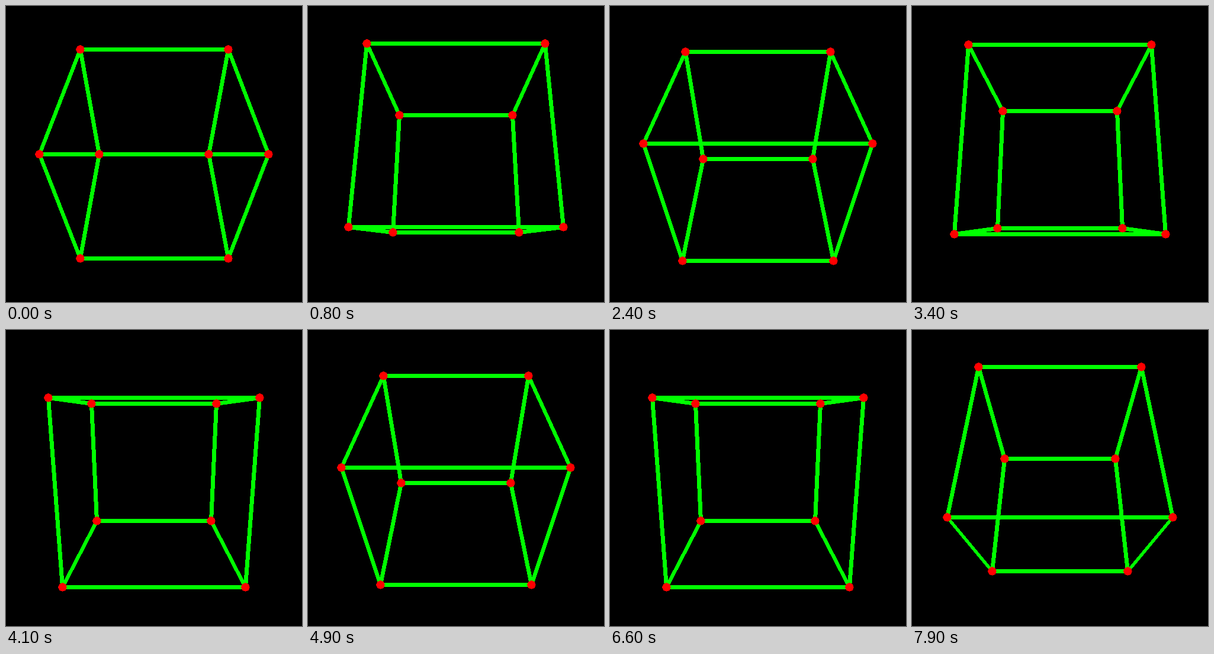
These frames come from a looping animation (500 by 500 pixels, 8 s). An HTML page:

```html
<!DOCTYPE html>
<html lang="en">
<head>
<meta charset="utf-8">
<title>Rotating cube</title>
<style>
  html, body { margin: 0; width: 100%; height: 100%; overflow: hidden; background: #000; }
  svg { display: block; width: 500px; height: 500px; shape-rendering: crispEdges; }
  polygon { fill: #0f0; }
  circle { fill: #f00; }
</style>
</head>
<body>
<svg id="stage" viewBox="0 0 500 500"></svg>
<script>
  const STEP_MS = 100, STEPS = 80, TURN = 3.6;
  const CENTER = 250, FOCAL = 500, DISTANCE = 4, HALF = 3.5;
  const stage = document.getElementById('stage');

  function add(tag) {
    const el = document.createElementNS('http://www.w3.org/2000/svg', tag);
    stage.appendChild(el);
    return el;
  }

  // Corners 0-3 circle the left face, 4-7 the right face.
  const edges = [];
  for (let k = 0; k < 4; k++) {
    const next = (k + 1) % 4;
    edges.push([k, next], [k + 4, next + 4], [k, k + 4]);
  }
  const bars = edges.map(() => add('polygon'));
  const dots = Array.from({ length: 8 }, () => {
    const dot = add('circle');
    dot.setAttribute('r', 7.2);
    return dot;
  });

  // Snap to whole pixels, then aim at the pixel's middle.
  const snap = v => Math.floor(CENTER + v + 1e-6) + 0.5;

  function project(i, degrees) {
    const angle = (degrees + 90 * (i % 4)) * Math.PI / 180;
    const scale = FOCAL / (DISTANCE - Math.SQRT2 * Math.cos(angle));
    return [snap(i < 4 ? -scale : scale), snap(scale * Math.SQRT2 * Math.sin(angle))];
  }

  // Line thickness is measured along the minor axis.
  function bar([x1, y1], [x2, y2]) {
    const steep = Math.abs(y2 - y1) > Math.abs(x2 - x1);
    const dx = steep ? HALF : 0, dy = steep ? 0 : HALF;
    return [x1 - dx, y1 - dy, x2 - dx, y2 - dy, x2 + dx, y2 + dy, x1 + dx, y1 + dy].join(' ');
  }

  let shown = -1;
  function draw(step) {
    const points = dots.map((_, i) => project(i, step * TURN));
    edges.forEach(([a, b], i) => bars[i].setAttribute('points', bar(points[a], points[b])));
    dots.forEach((dot, i) => {
      dot.setAttribute('cx', points[i][0]);
      dot.setAttribute('cy', points[i][1]);
    });
    shown = step;
  }

  function tick() {
    const step = Math.floor(performance.now() / STEP_MS) % STEPS;
    if (step !== shown) draw(step);
    requestAnimationFrame(tick);
  }
  tick();
</script>
</body>
</html>
```
